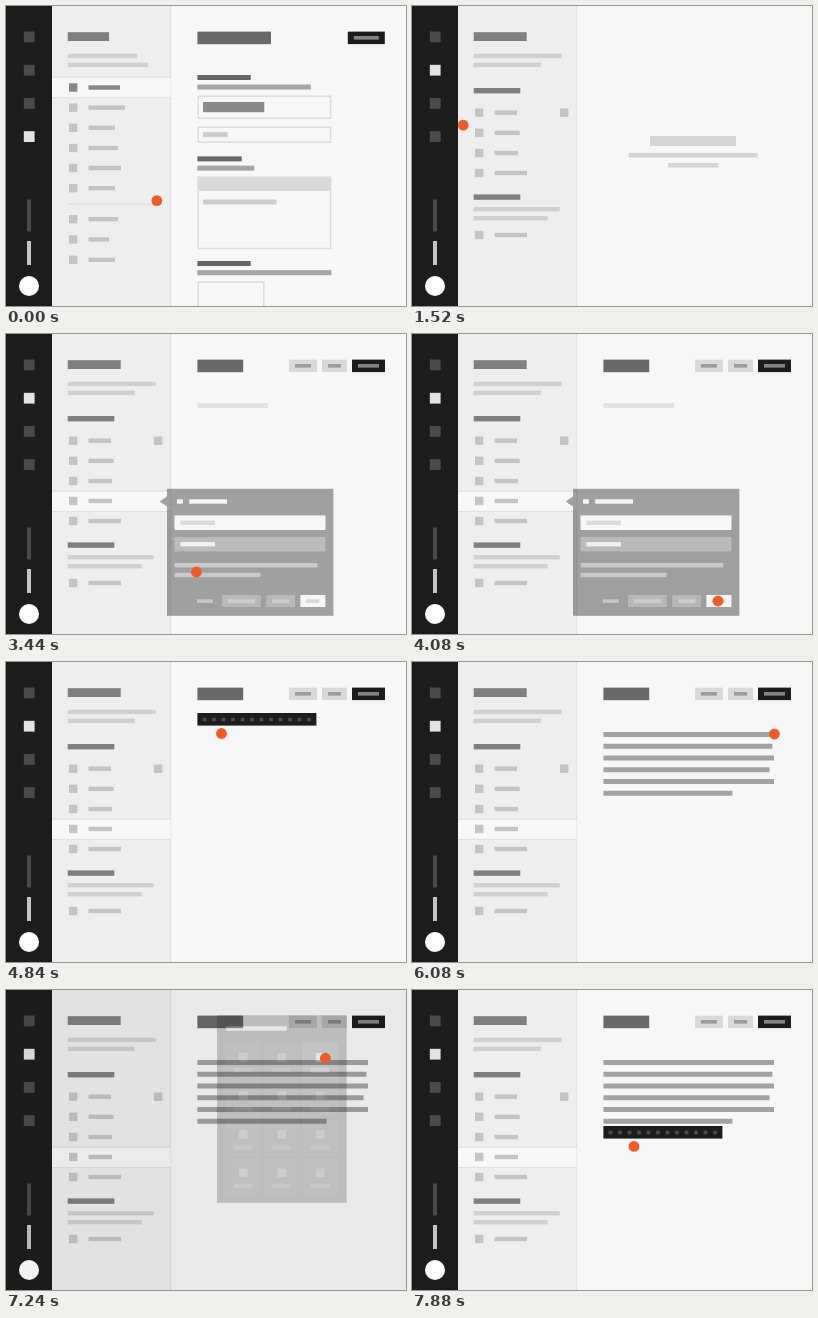
An HTML page that plays this animation: 400 px wide and 300 px high, repeating every 8000 ms.

```html
<!DOCTYPE html>
<html lang="en">
<head>
<meta charset="utf-8">
<title>Site editor walkthrough</title>
<style>
html, body { margin: 0; width: 100%; height: 100%; overflow: hidden; background: #f7f7f7; }
svg { display: block; width: 100vw; height: 100vh; }
</style>
</head>
<body>
<svg id="stage" viewBox="0 0 400 300"></svg>
<script>
const LOOP = 8000;
const INK = '#1c1c1c', DARK = '#7f7f7f', SOFT = '#d0d0d0', ITEM = '#c4c4c4';

const rect = (x, y, w, h, fill) => `<rect x="${x}" y="${y}" width="${w}" height="${h}" fill="${fill}"/>`;
const frame = (x, y, w, h) =>
  `<rect x="${x}" y="${y}" width="${w}" height="${h}" fill="none" stroke="#dcdcdc" stroke-width="1.6"/>`;
const group = (id, ...parts) => `<g id="${id}">${parts.join('')}</g>`;
const row = (cy, w, fill = ITEM) => rect(63, cy - 4.2, 8.4, 8.4, fill) + rect(82.5, cy - 2.2, w, 4.4, fill);
const rows = list => list.map(([cy, w]) => row(cy, w)).join('');
const highlight = y => rect(46, y, 118.5, 21.5, '#e0e0e0') + rect(46, y + 1.2, 118.5, 19.2, '#f8f8f8');
const button = (x, w, fill, ink) => rect(x, 25.6, w, 12.5, fill) + rect(x + 6, 30, w - 12, 3.6, ink);
const label = (y, w) => rect(191.4, y, w, 5, '#666');
const hint = (y, w) => rect(191.4, y, w, 5, '#a5a5a5');

const tile = (x, y, id = '') => {
  const shape = (bg, icon, text) =>
    rect(x, y, 36.4, 36.4, bg) + rect(x + 14, y + 10.6, 8.6, 8.6, icon) + rect(x + 8.6, y + 25.8, 19, 4.4, text);
  return shape('#2b2b2b', '#6c6c6c', '#545454') + (id && group(id, shape('#3b3b3b', '#d6d6d6', '#858585')));
};

const nav = active => [25.5, 58.8, 92, 125.2]
  .map((y, i) => rect(17.8, y, 10.8, 10.8, i === active ? '#e2e2e2' : '#4b4b4b')).join('');

const navBar = rect(0, 0, 46, 300, INK) + rect(21, 193.5, 4, 32, '#4b4b4b') + rect(21, 235, 4, 24, '#c4c4c4') +
  '<circle cx="23" cy="280" r="10" fill="#fff"/>';

const settings = group('settings', nav(3),
  rect(61.7, 26.2, 41.3, 8.8, DARK), rect(61.7, 47.7, 69.5, 4.4, SOFT), rect(61.7, 56.6, 80.5, 4.4, SOFT),
  highlight(70.7), row(81.5, 31.5, '#878787'),
  rows([[101.6, 36.5], [121.8, 26.5], [142, 29.5], [162, 32.5], [182.2, 26.5], [213.2, 29.5], [233.5, 20.5], [253.8, 26.5]]),
  rect(61.7, 197.5, 95, 1.4, '#e0e0e0'),
  rect(191.4, 25.6, 73.6, 12.6, '#696969'), button(341.8, 37, INK, '#858585'),
  label(69, 53.3), hint(78.5, 113.4), frame(192.2, 90.3, 132.4, 22), rect(197, 96, 61.3, 10.2, '#8a8a8a'),
  frame(192.2, 121.2, 132.4, 15), rect(197, 126.2, 24.6, 5, '#cdcdcd'),
  label(150.4, 44.3), hint(159.6, 56.8), rect(192, 171, 133, 14, '#d9d9d9'), frame(192.2, 171.2, 132.4, 71.3),
  rect(197, 193.5, 73.5, 5, '#cdcdcd'),
  label(255, 53.3), hint(264.2, 134), frame(192.2, 276, 65.6, 40));

const pages = group('pages', nav(1),
  rect(61.7, 26.2, 53, 8.8, DARK), rect(61.7, 47.7, 88, 4.4, SOFT), rect(61.7, 56.6, 67, 4.4, SOFT),
  rect(61.7, 82, 46.6, 5.4, DARK),
  rows([[106.7, 22.5], [126.8, 25.2], [147, 23.5]]), rect(148, 102.5, 8.4, 8.4, ITEM),
  group('newRow', highlight(156.5), row(167, 23.5)),
  group('lower', row(167, 32.5), rect(61.7, 188.4, 46.6, 5.4, DARK),
    rect(61.7, 201, 86, 4.4, SOFT), rect(61.7, 210, 74, 4.4, SOFT), row(229, 32.5)),
  group('empty', rect(238, 130, 86, 10, '#d5d5d5'), rect(216.6, 147, 129, 4.5, '#d5d5d5'),
    rect(256, 157, 50.3, 4.5, '#d5d5d5')));

const editor = group('editor',
  rect(191.4, 25.6, 45.8, 12.6, '#696969'),
  button(283, 28, '#d9d9d9', '#9c9c9c'), button(316, 25, '#d9d9d9', '#9c9c9c'), button(346, 33, INK, '#858585'),
  group('placeholder', rect(191.4, 69, 70.8, 5, '#e1e1e1')),
  group('caret', rect(191.4, 67, 1.4, 9, '#555')),
  group('copy', [362, 360.4, 362, 357.6, 362, 320.4]
    .map((right, i) => rect(191.4, 70 + 11.75 * i, right - 191.4, 5, '#a2a2a2')).join('')),
  group('toolbar', rect(191.4, 51, 119, 12.6, INK),
    Array.from({ length: 12 }, (_, i) => rect(196.7 + 9.5 * i, 55.7, 3.6, 3.6, '#4c4c4c')).join('')));

const pageMenu = group('pageMenu', rect(156.8, 155.3, 129.6, 110.7, INK),
  `<path d="M157 163L150 168L157 173Z" fill="${INK}"/>`,
  rect(167.2, 165.6, 5.8, 4.4, '#e8e8e8'), rect(183.3, 165.6, 61.2, 4.4, '#e2e2e2'),
  tile(164.8, 182, 'hoverA'), tile(203.1, 182), tile(241.5, 182), tile(164.8, 220.6, 'hoverB'), tile(203.1, 220.6));

const form = group('form', rect(161, 154.8, 166.4, 127, INK),
  `<path d="M161 162.5L153.6 167.5L161 172.5Z" fill="${INK}"/>`,
  rect(171, 165.3, 5.8, 4.4, '#f8f8f8'), rect(183.2, 165.3, 37.8, 4.4, '#f0f0f0'),
  rect(168.5, 181.4, 151, 14.6, '#f8f8f8'), rect(174.4, 186.6, 34.5, 4.4, '#b0b0b0'),
  rect(168.5, 203, 151, 14.4, '#606060'), rect(174.4, 208, 34.5, 4.4, '#e8e8e8'),
  rect(168.5, 229, 143, 4.4, '#858585'), rect(168.5, 238.8, 86, 4.4, '#858585'),
  rect(190.8, 265.3, 16, 3.6, '#808080'),
  rect(216, 261, 38.8, 12, '#585858'), rect(221.6, 265.3, 27.4, 3.6, '#8c8c8c'),
  rect(260.3, 261, 28.8, 12, '#585858'), rect(266, 265.3, 17.4, 3.6, '#8c8c8c'),
  rect(294.4, 261, 25, 12, '#f8f8f8'), rect(300, 265.3, 13.4, 3.6, '#b0b0b0'));

const blockMenu = group('blockMenu', rect(211, 25.2, 129.7, 187.6, INK), rect(220, 36.3, 60.7, 4.4, '#e2e2e2'),
  [52.4, 91, 129.5, 168].map((y, r) =>
    [219, 257.4, 295.8].map((x, c) => tile(x, y, r === 0 && c === 2 ? 'hoverC' : '')).join('')).join(''));

const stage = document.getElementById('stage');
stage.innerHTML = rect(0, 0, 400, 300, '#f7f7f7') + rect(46, 0, 118, 300, '#eee') + rect(164, 0, 1.2, 300, '#e1e1e1') +
  navBar + settings + pages + editor + pageMenu + form +
  group('dim', rect(0, 0, 400, 300, '#000')) + blockMenu +
  '<circle id="cursor" r="5.4" fill="#f15a29"/>';

const el = {};
stage.querySelectorAll('[id]').forEach(node => el[node.id] = node);

const ramp = (t, from, to) => Math.min(1, Math.max(0, (t - from) / (to - from)));
const ease = p => 0.5 - 0.5 * Math.cos(Math.PI * p);
const between = (t, from, to) => t >= from && t < to ? 1 : 0;
const show = (name, opacity) => {
  el[name].style.display = opacity > 0 ? '' : 'none';
  el[name].setAttribute('opacity', opacity);
};

// Each move: start time, end time, bend point, destination
const HOME = [150.8, 194.6];
const MOVES = [
  [440, 1000, [92, 128], [26.5, 66.5]],
  [1280, 1800, [43.6, 133], [109.5, 167.5]],
  [2160, 2720, [174, 184], [190.4, 238]],
  [3640, 3880, [255, 262], [306, 267]],
  [4120, 4600, [282, 140], [215.5, 71.5]],
  [5720, 6080, [290, 62], [362.4, 72]],
  [6400, 6720, [356, 18.5], [314, 67]],
  [7200, 7680, [468, 100], [222, 156.4]]
];

function cursorAt(t) {
  let pos = HOME;
  for (const [start, end, bend, dest] of MOVES) {
    if (t < start) break;
    const p = ease(ramp(t, start, end)), q = 1 - p;
    pos = pos.map((v, i) => q * q * v + 2 * p * q * bend[i] + p * p * dest[i]);
  }
  return pos;
}

function draw(t) {
  const created = t >= 3000;
  show('settings', between(t, 0, 1160));
  show('pages', between(t, 1160, LOOP));
  show('empty', between(t, 1160, 3000));
  show('newRow', created ? ramp(t, 3000, 3280) : 0);
  el.lower.setAttribute('transform', `translate(0 ${20 * ease(ramp(t, 3000, 3280))})`);

  show('editor', created ? 1 : 0);
  show('placeholder', between(t, 3000, 4680));
  show('caret', between(t, 5000, 5200));
  show('copy', between(t, 5400, LOOP));
  const late = t > 7000;
  show('toolbar', late ? ramp(t, 7720, 7880) : ramp(t, 4640, 4840) - ramp(t, 5720, 5960));
  el.toolbar.setAttribute('transform', `translate(0 ${late ? 85 : 0})`);

  show('pageMenu', ramp(t, 1920, 2120) - ramp(t, 2960, 3160));
  show('form', ramp(t, 3320, 3630) - ramp(t, 3960, 4160));
  const menu = ramp(t, 6120, 6570) - ramp(t, 6960, 7320);
  show('blockMenu', menu);
  show('dim', 0.225 * menu);

  const [x, y] = cursorAt(t);
  const inFirstColumn = x > 164.8 && x < 201.2;
  show('hoverA', inFirstColumn && y > 182 && y < 219.5 ? 1 : 0);
  show('hoverB', inFirstColumn && y >= 219.5 && y < 257 ? 1 : 0);
  show('hoverC', x > 295.8 && x < 332.2 && y > 52.4 && y < 88.8 ? 1 : 0);
  el.cursor.setAttribute('cx', x);
  el.cursor.setAttribute('cy', y);
}

const origin = performance.now();
function tick() {
  draw((performance.now() - origin) % LOOP);
  requestAnimationFrame(tick);
}
tick();
</script>
</body>
</html>
```
